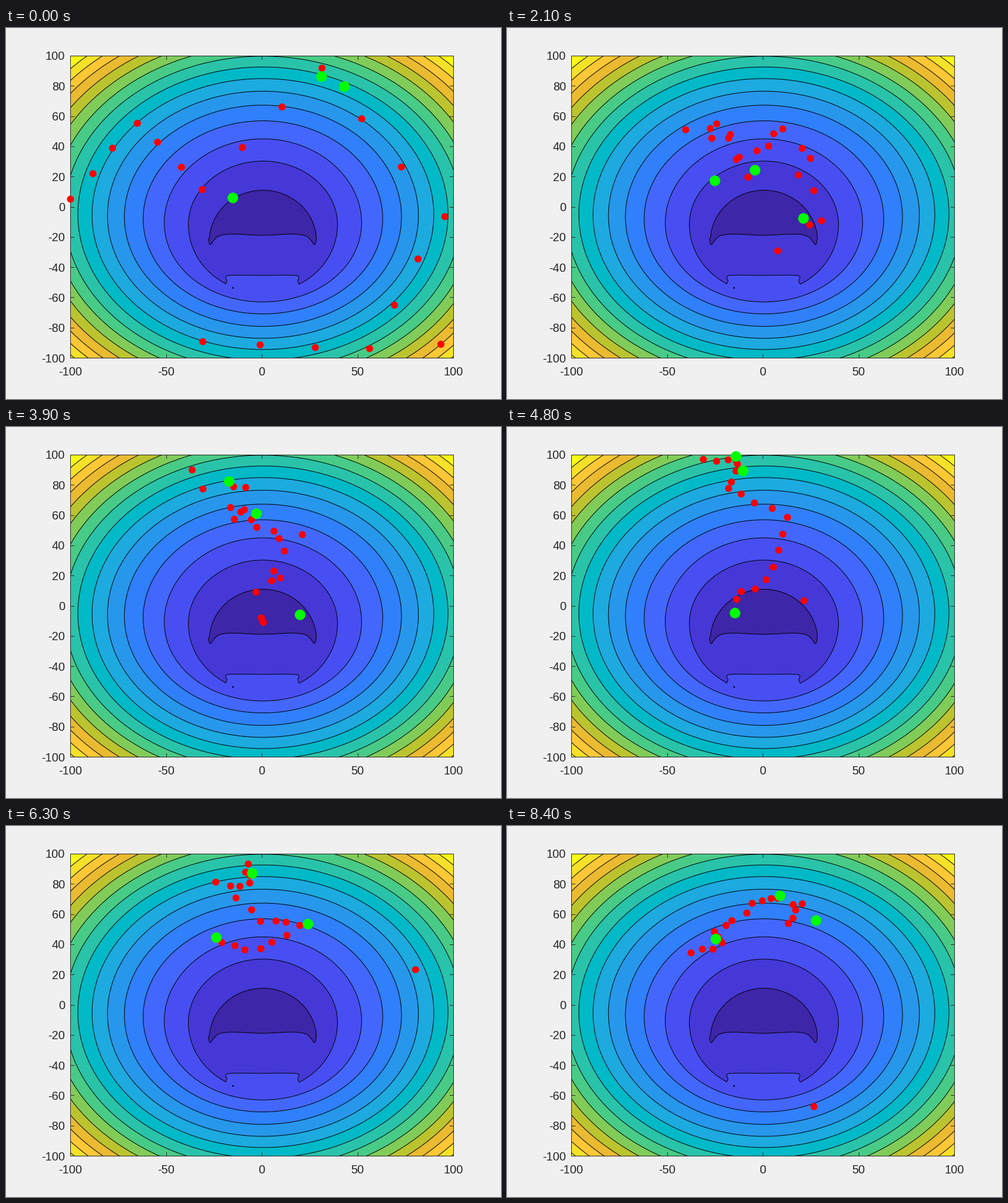
Animation of 840x630 px, one loop 8700 ms. Source, as a matplotlib script:

```python
import numpy as np
import matplotlib.pyplot as plt
from matplotlib.animation import FuncAnimation
from matplotlib.patches import Circle, Polygon, Rectangle

DPI = 100
PX = 72 / DPI                      # one pixel in points
LEFT, TOP, RIGHT, BOTTOM = 109.5, 47.5, 759.5, 560.5
MID = 435
FRAMES, STEP_MS = 29, 300
SWARM = 20
INK = "#262626"
BANDS = ["#3e26a8", "#4538d7", "#484ff2", "#4367fd", "#2f80fa", "#2797eb",
         "#1caadf", "#01b9c7", "#29c3aa", "#48cb86", "#81cc59", "#bbc42f",
         "#eaba31", "#fec735", "#f5e128", "#f9fb15"]

plt.rcParams["font.family"] = "Liberation Sans"
plt.rcParams["path.snap"] = False
fig = plt.figure(figsize=(8.4, 6.3), dpi=DPI, facecolor="#f0f0f0")
ax = fig.add_axes([0, 0, 1, 1])
ax.set_xlim(0, 840)
ax.set_ylim(630, 0)
ax.axis("off")


def px(x):
    return 434.5 + 3.25 * x


def py(y):
    return 304 - 2.565 * y


def crisp(v):
    return np.floor(v) + 0.5


# ---- filled contours -------------------------------------------------------
frame = dict(xy=(LEFT, TOP), width=RIGHT - LEFT, height=BOTTOM - TOP)
box = ax.add_patch(Rectangle(**frame, fc=BANDS[-1], ec="none"))


def band(points, color):
    shape = ax.add_patch(Polygon(points, fc=color, ec="black", lw=PX))
    shape.set_clip_path(box)


def egg(cy, a, b, taper=0.0, start=0, end=360):
    """Elliptic arc in pixels, a little wider below its centre."""
    t = np.radians(np.linspace(start, end, 181))
    x = a * np.cos(t) * (1 - taper * np.sin(t))
    return np.column_stack([MID + 1 + x, cy - b * np.sin(t)])


def mirrored(half, n=8):
    """Catmull-Rom curve through a right half and its mirror image, left to right."""
    p = np.array(half, float)
    left = p[:-1] * (-1, 1) + (2 * MID, 0)
    p = np.vstack([left[:1], left, p[::-1], p[:1]])
    t = np.linspace(0, 1, n, endpoint=False)[:, None]
    parts = [0.5 * (2 * b + (c - a) * t + (2 * a - 5 * b + 4 * c - d) * t**2
                    + (3 * b - a - 3 * c + d) * t**3)
             for a, b, c, d in zip(p, p[1:], p[2:], p[3:])]
    return np.vstack(parts + [p[-1:]])


# A bowl whose rings settle on evenly growing areas and drift to the centre.
for level in range(15, 2, -1):
    r = np.sqrt(9332 + 1388 * (level - 8) + 260 * 2.0 ** (3 - level))
    cy = -415 / r - 0.8 * 4.0 ** (3 - level)
    tall = r + 3.4e5 / r**3
    band(egg(py(cy), 3.25 * r, 2.565 * tall, 0.028 * (51.5 / r) ** 3),
         BANDS[level - 1])

notch = mirrored([(497.5, 435), (495, 429), (497, 424), (489, 420), (MID, 420)])
band(np.vstack([egg(331, 126.5, 105, 0.02, 0, 180),
                egg(331, 126.5, 118.5, 0.02, 180, 240), notch,
                egg(331, 126.5, 118.5, 0.02, 299, 360)]), BANDS[1])

smile = mirrored([(526.5, 359), (523.5, 368), (517, 360), (507, 352.5),
                  (485, 350), (MID, 352)])
band(np.vstack([egg(362, 91, 86.5, 0, 4, 176), smile]), BANDS[0])

ax.add_patch(Circle((385.3, 441.3), 1.4, color="black", lw=0))
ax.add_patch(Circle((484.5, 441.5), 0.5, color="black", lw=0, alpha=0.5))

# ---- axes box, ticks and labels -------------------------------------------
ax.add_patch(Rectangle(**frame, fill=False, ec=INK, lw=PX))


def tick(x, y, dx, dy):
    ax.plot([x, x + dx], [y, y + dy], color=INK, lw=PX, solid_capstyle="butt")


def label(x, y, value, ha):
    ax.text(x, y, str(value), ha=ha, va="baseline", fontsize=20 * PX, color=INK)


for v in range(-100, 101, 50):
    x = crisp(px(v))
    tick(x, BOTTOM, 0, -6.5)
    tick(x, TOP, 0, 6.5)
    label(px(v) - 0.5, 590, v, "center")
for v in range(-100, 101, 20):
    y = crisp(py(v))
    tick(LEFT, y, 6.5, 0)
    tick(RIGHT, y, -6.5, 0)
    label(100, py(v) + 7, v, "right")

# ---- swarm -----------------------------------------------------------------
steps, packs, leads = [], [], []


def pose(step, lead, stray, path):
    """Three leaders, one stray dot, the rest strung along a path."""
    rng = np.random.default_rng(step)
    x, y = np.transpose(path)
    u = np.linspace(0, len(path) - 1, SWARM - 1)
    knots = np.arange(len(path))
    line = np.column_stack([np.interp(u, knots, x), np.interp(u, knots, y)])
    line += rng.normal(0, 3, line.shape)
    steps.append(step)
    packs.append(np.vstack([line, stray]))
    leads.append(np.array(lead, float))


pose(0, [(385, 288.5), (535.5, 82.5), (574, 99.5)], (738, 537),
     [(109, 291), (219, 159), (340, 275), (535, 65), (742, 320), (620, 545),
      (336, 533)])
pose(4, [(348.5, 379.5), (413, 253), (448.5, 352.5)], (336, 391),
     [(290, 267), (362, 176), (398, 228), (500, 135), (594, 263), (489, 349)])
pose(10, [(376, 132), (438.5, 225), (580.5, 307)], (490, 106),
     [(310, 65), (387, 140), (394, 215), (431, 210), (471, 227), (440, 270),
      (518, 358)])
pose(16, [(388.5, 50), (400.5, 74.5), (387, 316)], (504, 295),
     [(335, 53), (398, 60), (373, 105), (478, 147), (446, 255), (388, 290)])
pose(21, [(418, 80.5), (357, 189.5), (512.5, 166.5)], (695, 244),
     [(410, 60), (416, 100), (361, 100), (435, 158), (499, 166), (431, 211),
      (365, 200)])
pose(25, [(434.5, 126.5), (336, 187.5), (337, 187.5)], (637, 517.5),
     [(301, 209), (361, 205), (377, 191), (416, 134), (451, 109), (481, 124),
      (484, 176)])
pose(28, [(463.5, 118.5), (354.5, 192), (524.5, 160.5)], (521, 476.5),
     [(316, 215), (365, 202), (350, 183), (400, 148), (446, 118), (500, 135),
      (477, 165)])


def wander(key, n, rng):
    """Glide between poses; dots far from the crowd stray further."""
    k = min(np.searchsorted(steps, n, side="right") - 1, len(steps) - 2)
    u = (n - steps[k]) / (steps[k + 1] - steps[k])
    p = key[k] + (key[k + 1] - key[k]) * u
    far = np.linalg.norm(p - np.median(p, axis=0), axis=1, keepdims=True)
    p = p + rng.normal(size=p.shape) * (4 + 0.1 * far) * np.sin(np.pi * u)
    return np.clip(p, (LEFT, TOP), (RIGHT, BOTTOM))


def dots(count, radius, color):
    return [ax.add_patch(Circle((0, 0), radius, color=color, lw=0, zorder=5))
            for _ in range(count)]


red = dots(SWARM, 6, "#ff0000")
green = dots(3, 9, "#00ff00")


def update(n):
    rng = np.random.default_rng(50 + n)
    for group, key in ((red, packs), (green, leads)):
        for dot, spot in zip(group, wander(key, n, rng)):
            dot.center = spot
    return red + green


anim = FuncAnimation(fig, update, frames=FRAMES, interval=STEP_MS,
                     repeat=True, repeat_delay=0)
plt.show()
```
